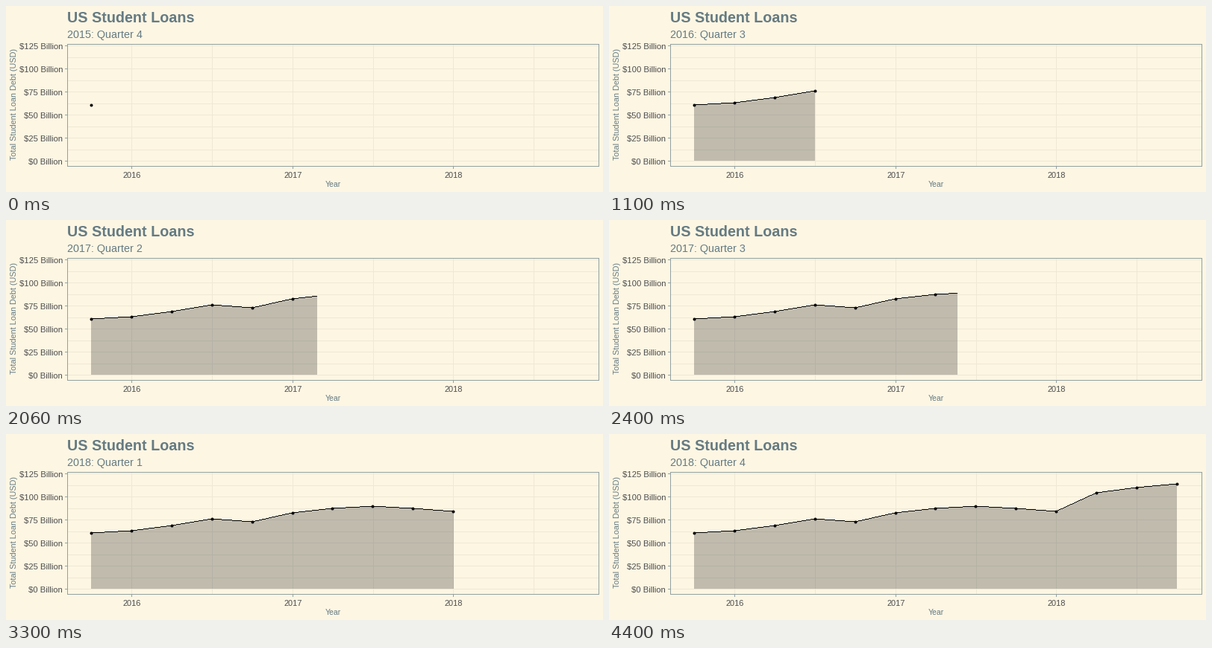
These frames come from a looping animation (800x250 px, 4.42 s). A matplotlib script:

```python
import matplotlib.pyplot as plt
import numpy as np
from matplotlib.animation import FuncAnimation

plt.rcParams["font.family"] = "Liberation Sans"

WIDTH, HEIGHT, DPI = 800, 250, 100
PX = 72 / DPI  # points per pixel
FRAMES, INTERVAL = 221, 20

PAPER, GRID, FRAME = "#fdf6e3", "#eee8d5", "#93a1a1"
TITLE, LABEL = "#657b83", "#4d4d4d"

LEFT, RIGHT, TOP, BOTTOM = 82, 794, 51, 215
BASE, BILLION = 208, 1.24  # zero line and pixels per billion
START, END = 114.2, 760.7

debt = np.array([60.5, 62.9, 68.5, 75.8, 72.6, 82.3, 87.1,
                 89.5, 87.1, 83.9, 104.0, 109.7, 113.7])
last = len(debt) - 1
xs = np.linspace(START, END, len(debt))
ys = BASE - BILLION * debt

fig = plt.figure(figsize=(WIDTH / DPI, HEIGHT / DPI), dpi=DPI, facecolor=PAPER)
ax = fig.add_axes([0, 0, 1, 1])
ax.set(xlim=(0, WIDTH), ylim=(HEIGHT, 0))
ax.axis("off")


def rule(x, y, color, z):
    """Draw a one-pixel line; the coordinate given once is a pixel index."""
    ax.plot(x, y, color=color, lw=PX, zorder=z, snap=False,
            solid_capstyle="butt")


def hline(y, x0, x1, color, z):
    rule([x0, x1], [y + 0.5] * 2, color, z)


def vline(x, y0, y1, color, z):
    rule([x + 0.5] * 2, [y0, y1], color, z)


def write(x, y, text, size, color, **style):
    style = {"va": "baseline", **style}
    return ax.text(x, y, text, fontsize=size * PX, color=color, **style)


# Horizontal grid, ticks and labels
for k in range(11):
    y = BASE - 31 * k // 2
    hline(y, LEFT, RIGHT, GRID, 1)
    if k % 2 == 0:
        hline(y, LEFT - 3, LEFT, FRAME, 5)
        write(76, y + 5, f"${25 * k // 2} Billion", 11.2, LABEL, ha="right")

# Vertical grid, ticks and labels
for k in range(6):
    x = int(168.6 + 107.8 * k)
    vline(x, TOP, BOTTOM, GRID, 1)
    if k % 2 == 0:
        vline(x, BOTTOM + 1, BOTTOM + 4, FRAME, 5)
        write(x + 0.5, 231, str(2016 + k // 2), 11, LABEL, ha="center")

# Panel border
for y in (TOP, BOTTOM):
    hline(y, LEFT, RIGHT + 1, FRAME, 5)
for x in (LEFT, RIGHT):
    vline(x, TOP, BOTTOM + 1, FRAME, 5)

write(82, 22, "US Student Loans", 19.8, TITLE, weight="bold")
subtitle = write(82, 43, "", 14.4, TITLE)
write(438, 243, "Year", 10.4, TITLE, ha="center")
write(11, 132, "Total Student Loan Debt (USD)", 10.8, TITLE,
      ha="center", va="center", rotation=90)

# Area and line are built from whole pixel columns, so their edges stay hard
area = ax.stairs([BASE], [START, START], baseline=BASE, fill=True,
                 color="#333333", alpha=0.3, lw=0, zorder=2)
line = ax.stairs([BASE], [START, START], baseline=BASE, fill=True,
                 color="black", lw=0, zorder=3)
dots, = ax.plot([], [], "o", color="black", ms=4 * PX, mew=0, zorder=4)
ax.set(xlim=(0, WIDTH), ylim=(HEIGHT, 0))


def draw(frame):
    head = START + (END - START) * frame / (FRAMES - 1)
    shown = last * frame // (FRAMES - 1) + 1

    edges = np.arange(int(START), np.ceil(head) + 1)
    rows = np.floor(np.interp(edges[:-1] + 0.5, xs, ys))
    area.set_data(rows, edges, np.full(len(rows), BASE))
    line.set_data(rows, edges, rows + 1)
    for part in (area, line):
        part.set_visible(frame > 0)
    dots.set_data(xs[:shown], ys[:shown])

    # The label steps evenly through the quarters, starting at 2015 Q4
    year, quarter = divmod(frame * len(debt) // FRAMES + 3, 4)
    subtitle.set_text(f"{2015 + year}: Quarter {quarter + 1}")
    return area, line, dots, subtitle


anim = FuncAnimation(fig, draw, frames=FRAMES, interval=INTERVAL,
                     repeat=True, repeat_delay=0, blit=False)
plt.show()
```
